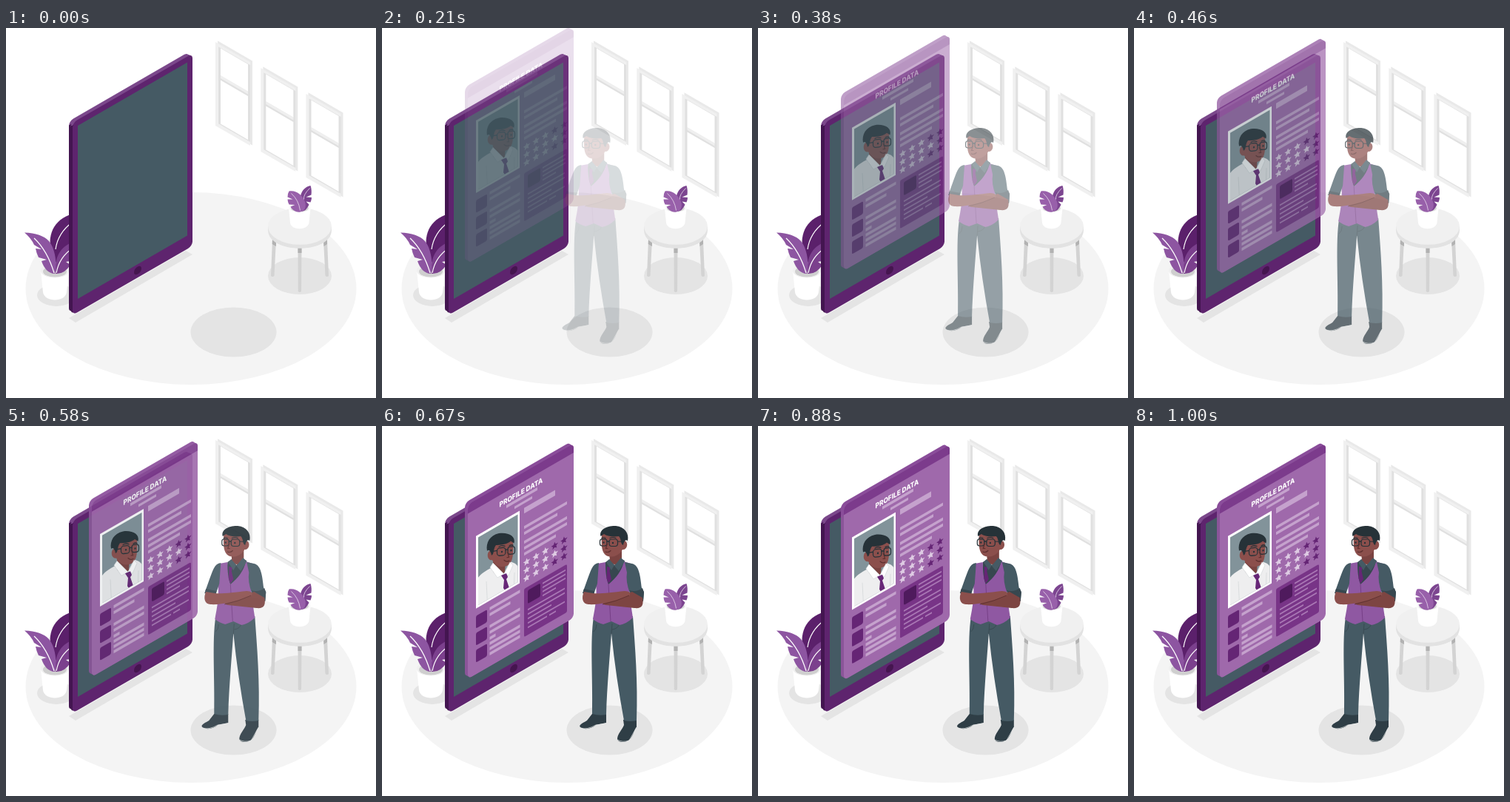
Write an HTML page that moves like this. It is 500x500 px and loops after 1.04 s.

```html
<!DOCTYPE html>
<html lang="en">
<head>
<meta charset="utf-8">
<title>Profile data</title>
<style>
  html, body { margin: 0; width: 100%; height: 100%; overflow: hidden; background: #fff; }
  svg { display: block; width: 100vw; height: 100vh; }
  text { font: 800 9.6px Inter, Roboto, sans-serif; }
</style>
</head>
<body>
<svg viewBox="0 0 500 500">
  <defs>
    <linearGradient id="tabletSide" x2="0" y2="1">
      <stop offset=".022" stop-color="#7b488b"/><stop offset=".022" stop-color="#431550"/>
    </linearGradient>
    <linearGradient id="panelSide" x2="0" y2="1">
      <stop offset=".065" stop-color="#8a4d9a"/><stop offset=".065" stop-color="#8b5599"/>
    </linearGradient>
    <clipPath id="photoClip"><path d="M130 150.5L183.5 119.6V211L130 241.9Z"/></clipPath>
    <clipPath id="panelClip"><rect y="4" width="143" height="236" rx="6"/></clipPath>

    <g id="window">
      <rect x="3" y="-3.4" width="47" height="114" fill="#e9e9e9"/>
      <rect width="47" height="113" fill="#f0f0f0"/>
      <rect x="4" y="4" width="43" height="104" fill="#e0e0e0"/>
      <rect x="7" y="4.500" width="37" height="37" fill="#fff"/>
      <rect x="7" y="41" width="37" height="4" fill="#efefef"/>
      <rect x="7" y="47.500" width="37" height="59" fill="#fff"/>
    </g>

    <g id="head">
      <path fill="#7a4341" d="M307 168L308 183Q315 192 324 181V164Z"/>
      <path fill="#8b4f4c" d="M297 146C296 162 297 171 303 175C311 179 321 175 325 167C331 168 334 158 328 155L328 143H300Z"/>
      <path fill="#263238" d="M295.500 149C293 140 304 134.500 316 135C328 136 334 145 332 155C329 153 327 156 326 161C322 160 324 153 320 149C312 150 304 149 300 146Z"/>
      <g fill="none" stroke="#263238" stroke-width="1.200" stroke-linecap="round">
        <rect x="294.500" y="152.800" width="9.500" height="9.200" rx="3"/>
        <rect x="307" y="153" width="11.500" height="9.500" rx="3.500"/>
        <path d="M304 156.500Q305.500 155 307 156.500M318.500 156L327 156.500M297 151.500Q299 150 302 151.500M308 151.500Q312 149.500 316 151.500"/>
        <path stroke="#5d2f2f" d="M304.500 159L302.500 165.500H305M302 170Q306 171.500 309 168.500"/>
      </g>
      <g fill="#263238"><circle cx="299.500" cy="157.500" r="1.200"/><circle cx="312" cy="158" r="1.200"/></g>
    </g>
  </defs>

  <ellipse cx="250" cy="352" rx="223.500" ry="130" fill="#f4f4f4"/>
  <g fill="#e4e4e4">
    <ellipse cx="68" cy="361" rx="26" ry="15"/>
    <ellipse cx="397" cy="335" rx="43" ry="25"/>
    <ellipse cx="307.500" cy="411" rx="58" ry="33.500"/>
    <path d="M85 392L243 301L252 306L94 398Z"/>
  </g>

  <use href="#window" transform="matrix(1 .577 0 1 283 19)"/>
  <use href="#window" transform="matrix(1 .577 0 1 344.300 54)"/>
  <use href="#window" transform="matrix(1 .577 0 1 405.500 89)"/>

  <!-- table with plant -->
  <g fill="#d3d3d3">
    <path d="M360 286H365L362.500 335Q360 337 358 335ZM429 286H434L436 335Q434 337 431.500 335ZM394.500 296H399.500L399 356Q397 358 394.800 356Z"/>
    <path fill="#b2b2b2" d="M360 286H365V295L359.700 292ZM429 286H434V292L429.500 295ZM394.500 296H399.500V304H394.500Z"/>
  </g>
  <path fill="#e2e2e2" d="M354 268V273C354 306 440 306 440 273V268Z"/>
  <ellipse cx="397" cy="268" rx="43" ry="24.800" fill="#f0f0f0"/>
  <path fill="#fff" d="M382 243L384 263C385 274 408 274 409.500 263L411.500 243Z"/>
  <ellipse cx="396.800" cy="243" rx="14.700" ry="6.500" fill="#fafafa"/>
  <ellipse cx="396.800" cy="243.500" rx="12" ry="5" fill="#d5d5d5"/>
  <g transform="translate(.5 .5)">
    <path fill="#7c4590" d="M398 247C395 232 396 216 411 212.500C412.500 217 412.500 221 412 225L405 228L412.500 228.500Q412.500 232 411 235L405 234L409 238C406 245 402 248 398 247Z"/>
    <path fill="#9860aa" d="M397 248C392 249 387 246 384 241L390 238.500L382 238Q380 234 380 231L387 231L380 228Q380 223 382 220C392 218 400 226 403 233C406 240 404 247 397 248Z"/>
    <path fill="none" stroke="#e9dcee" stroke-width=".8" d="M385 223Q395 232 397 246M410 216Q401 225 402 231"/>
  </g>

  <!-- floor plant -->
  <path fill="#fff" d="M47 328L50 357C52 371 80 371 82 357L85 328Z"/>
  <ellipse cx="66" cy="328" rx="19" ry="9.500" fill="#f0f0f0"/>
  <ellipse cx="66" cy="329" rx="16" ry="7.500" fill="#cfcfcf"/>
  <path fill="#5b206b" d="M62 304C55 282 63 259 90 251V300L68 318Z"/>
  <path fill="#7b408d" d="M67 332C65 314 71 295 92 289V314L81 316L87 320Q79 333 67 332Z"/>
  <path fill="#8d55a1" d="M66 332C57 332 51 324 48 315L55 313L44 310Q41 304 40 298L48 299L38 293Q34 284 25 276.500C40 277 52 281 58 288C65 296 70 315 66 332Z"/>
  <path fill="none" stroke="#fff" stroke-width="1.200" d="M38 284Q56 301 65 331M68 331Q72 309 91 297M67 299Q70 277 90 262"/>

  <!-- tablet -->
  <g transform="matrix(1 -.577 0 1 90 127.500)">
    <rect x="-5" y="-4.500" width="162" height="259" rx="6" fill="url(#tabletSide)"/>
    <rect x="-2.500" y="-2" width="162" height="260" rx="6" fill="url(#tabletSide)"/>
    <rect y=".5" width="162" height="260" rx="6" fill="#5e246e"/>
    <rect x="7" y="8.500" width="148" height="234" fill="#455a64"/>
    <circle cx="88" cy="250.800" r="5" fill="#45154f"/>
  </g>

  <g id="panel">
    <g transform="matrix(1 -.577 0 1 116 102)">
      <rect x="-4" y="-.6" width="143" height="236" rx="6" fill="url(#panelSide)"/>
      <rect x="-2" y="1.700" width="143" height="236" rx="6" fill="url(#panelSide)"/>
      <g clip-path="url(#panelClip)">
        <rect width="143" height="240" fill="#9f69ab"/>
        <rect width="143" height="16.500" fill="#7c3b8c"/>
      </g>
      <g id="details"></g>
      <rect x="11" y="53" width="59" height="98" fill="#fff"/>
    </g>
    <g transform="matrix(.866 -.5 0 1 158.500 110)"><text fill="#fff">PROFILE DATA</text></g>
    <g clip-path="url(#photoClip)">
      <path fill="#82939a" d="M120 110H190V250H120Z"/>
      <path fill="#eeeeef" d="M128 250V208C132 200 140 196 147 192L151 185L165 199L173 183L178 185C183 187 187 193 188 205V250Z"/>
      <use href="#head" transform="matrix(-1 .1 0 1.100 474 -35)"/>
      <path fill="#fff" stroke="#cfd3d6" stroke-width=".6" d="M146 191L150 185L165 200L156 205ZM165 200L173 184L177 188L171 202Z"/>
      <path fill="#672777" d="M161 202L168 199L170 204L168 207L172 219L168 225L164 219L165 208Z"/>
      <path fill="none" stroke="#d5d8da" stroke-width=".8" d="M141 210L143 250M179 198L178 230"/>
    </g>
  </g>

  <g id="man">
    <g transform="translate(1 0)">
      <path fill="#2f3e46" d="M283 389H302V401L288 404C282 409 273 411 267 407C264 404 271 401 276 398ZM325 397H343V407C339 412 338 421 332 425C327 428 318 428 317 423C317 416 324 410 326 404Z"/>
      <path fill="none" stroke="#e5e8e9" stroke-width=".7" d="M267 408Q276 411 288 404L302 402M317 424Q324 428 333 425L343 407"/>
      <path fill="#455a64" d="M285 258C280 290 284 340 283 389Q292 392 302 390C303 352 307 310 309 280C313 320 319 360 326 398Q335 400 343 398C345 345 341 300 338 257Z"/>
      <path fill="none" stroke="#37474f" stroke-width=".8" d="M309 281L310 267M310 275Q318 274 320 267M289 268Q289 275 285 278"/>
    </g>
    <path fill="#37474f" d="M302 184L300 215H318L328 182L322 179L314 188L308 180Z"/>
    <path fill="#8f58a2" d="M291 186L302 184C302 197 303 206 306 214C317 205 324 195 327 183L336 186C331 205 335 232 339 259Q331 267 321 269L310 264L299 268Q291 266 285 261C288 245 291 230 289 214Z"/>
    <path fill="none" stroke="#70397f" stroke-width=".8" d="M306 214L309 264"/>
    <path fill="#652575" d="M304 190L309 191L307.500 196L310 207L306 213L303.500 206L304 196Z"/>
    <use href="#head"/>
    <path fill="#455a64" d="M307 180L314 188L310 195L303 184ZM323 178L328 183L320 196L314 189ZM293 185C284 186 282 196 277 209L272 223L286 228L291 213ZM328 184L338 186C348 188 349 204 351 219L354 224L353 236L335 226Q329 210 331 198Z"/>
    <path fill="#37474f" d="M273 220L287 223L286 229L271 226ZM334 222Q344 225 352 219L354 225L353 237L346 237Z"/>
    <path fill="#7d4542" d="M352 232C354 243 351 247 341 246L303 242C296 241 298 237 305 236L338 224Z"/>
    <path fill="#8b4f4c" d="M273 224C269 232 271 241 279 241C293 242 315 237 335 229Q337 223 328 223C310 225 294 227 285 226Z"/>
    <path fill="none" stroke="#5d2f2f" stroke-width=".9" d="M298 241Q317 237 334 229"/>
  </g>
</svg>
<script>
const LOOP = 1040, FRAMES = 25, SHIFT = 30;
const $ = id => document.getElementById(id);

const bar = (x, y, w, h = 4, fill = '#c5a2cd', r = 0) =>
  `<rect x="${x}" y="${y}" width="${w}" height="${h}" rx="${r}" fill="${fill}"/>`;

function star(cx, cy, fill) {
  const points = Array.from({ length: 10 }, (_, i) => {
    const r = i % 2 ? 2.3 : 5, a = i * Math.PI / 5;
    return [cx + r * Math.sin(a), cy - r * Math.cos(a)].map(n => n.toFixed(2));
  });
  return `<polygon points="${points.join(' ')}" fill="${fill}"/>`;
}

function details() {
  let out = bar(52, 35, 42) + bar(63, 43, 24, 3.5) + bar(76, 52.5, 42, 7.5);
  [[77, 58], [85, 45], [97, 58], [105, 58], [113, 43]].forEach(([y, w]) => out += bar(76, y, w));
  [3, 4, 3].forEach((rating, row) => {
    for (let i = 0; i < 5; i++)
      out += star(79.5 + 12.6 * i, 127.5 + 10.9 * row, i < rating ? '#decbe3' : '#652575');
  });
  for (let i = 0; i < 3; i++) out += bar(11, 161 + 23 * i, 15, 17, '#652575', 2);
  [[160, 41], [168, 28], [184, 41], [192, 41], [200, 8], [207, 41], [214, 41], [221, 41]]
    .forEach(([y, w]) => out += bar(29.5, y, w));
  out += bar(76, 162, 58, 65, '#783487', 2) + bar(81, 167, 17, 18, '#4f1a5d', 2);
  const line = (x, y, w) => out += bar(x, y, w, 2, '#aa78b5');
  [31, 31, 31, 18].forEach((w, i) => line(101, 168 + 5.5 * i, w));
  [50, 50, 32, 50, 26].forEach((w, i) => line(81, 192 + 6 * i, w));
  line(110, 216, 9);
  return out;
}

// cubic-bezier(.36, -.01, .5, 1.38)
function ease(x) {
  const curve = (a, b, s) => 3 * a * s * (1 - s) ** 2 + 3 * b * s * s * (1 - s) + s ** 3;
  let lo = 0, hi = 1;
  for (let i = 0; i < 30; i++) {
    const mid = (lo + hi) / 2;
    if (curve(.36, .5, mid) < x) lo = mid; else hi = mid;
  }
  return curve(-.01, 1.38, lo);
}

function draw(now) {
  const step = Math.floor((now + 4) % LOOP / LOOP * FRAMES);
  const e = ease((step + 1) / FRAMES), offset = SHIFT * (e - 1);
  // the first three steps show the empty room
  const opacity = step < 3 ? 0 : Math.min(1, e);
  $('panel').setAttribute('transform', `translate(0 ${offset})`);
  $('man').setAttribute('transform', `translate(${offset} 0)`);
  $('panel').setAttribute('opacity', opacity);
  $('man').setAttribute('opacity', opacity);
}

$('details').innerHTML = details();
const start = performance.now();
function tick() {
  draw(performance.now() - start);
  requestAnimationFrame(tick);
}
tick();
</script>
</body>
</html>
```
